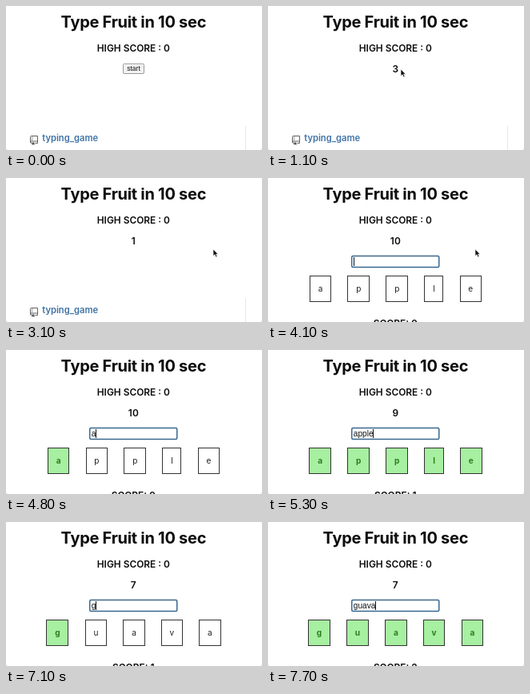
Recreate the animation shown at these times as an HTML page. Size 320 px wide and 180 px high, loop 8 s.

```html
<!DOCTYPE html>
<html lang="en">
<head>
<meta charset="utf-8">
<title>Typing game</title>
<style>
  html, body { margin: 0; width: 100%; height: 100%; overflow: hidden; background: #ddd; }
  #stage { position: relative; width: 320px; height: 180px; overflow: hidden; background: #fff;
    border-radius: 0 0 3px 3px; font-family: Inter, "Open Sans", sans-serif; }
  svg { position: absolute; left: 0; top: 0; }
  .head { text-anchor: middle; fill: #0c0c0c; }
  .title { font-size: 20px; font-weight: 700; letter-spacing: -.014em; }
  .sub { font-size: 11.9px; font-weight: 600; }
  .field { font: 10.1px "Liberation Sans", Arial, sans-serif; fill: #111; }
  .button { font: 8.5px "Liberation Sans", Arial, sans-serif; text-anchor: middle; fill: #111; }
  .link { font-size: 11.2px; font-weight: 600; fill: #3f73a8; }
  #tiles { position: absolute; left: 0; top: 122px; width: 319px; display: flex; justify-content: center; gap: 20.2px; }
  #tiles span { box-sizing: border-box; height: 33px; padding: 0 9.8px; border: 1px solid #333;
    font-size: 10.1px; line-height: 31px; color: #222; }
  #tiles .hit { background: #a7efa1; color: #2a7f1e; font-weight: 700; }
  [hidden] { display: none !important; }
</style>
</head>
<body>
<div id="stage">
  <svg width="320" height="180">
    <text class="head title" x="159.4" y="27">Type Fruit in 10 sec</text>
    <text class="head sub" x="159.3" y="57">HIGH SCORE : 0</text>
    <text class="head sub" id="count" x="159.3" y="83"></text>

    <g id="start">
      <rect id="face" x="146.5" y="72.2" width="26" height="12.3" rx="1.5" stroke="#9a9a9a"/>
      <text class="button" x="159.5" y="81.3">start</text>
    </g>

    <g id="footer">
      <path d="M299.5 150V180" stroke="#e8e8e8"/>
      <g transform="translate(30.5 162.5)" fill="none" stroke="#606060">
        <path d="M0 8.5V1Q0 0 1 0H9V9H6M2 9Q0 9 0 7.500T2 6.500H9"/>
        <path d="M2 0V6" stroke-width=".6"/>
        <path d="M2 8h3v3.500l-1.500-1-1.500 1z" fill="#555" stroke="none"/>
      </g>
      <text class="link" x="45.2" y="169.3">typing_game</text>
    </g>

    <g id="game">
      <rect x="104.75" y="97.5" width="109" height="14" rx="1.5" fill="#fff" stroke="#3a688f" stroke-width="1.5"/>
      <text class="field" id="typed" x="106.8" y="107.7"></text>
      <rect id="caret" y="99" width="1" height="11" fill="#111"/>
      <text class="head sub" id="score" x="159.3" y="186"></text>
    </g>
  </svg>
  <div id="tiles"></div>
  <svg width="320" height="180">
    <path id="pointer" d="M0 0V8.500L2 6.700L3.500 10L5 9.300L3.600 6.200H6Z" fill="#111" stroke="#fff" stroke-width=".6"/>
  </svg>
</div>
<script>
const LOOP = 8000, TICK = 100, PRESS = 1000, COUNTDOWN = 1100, GAME = 4100, KEY = 150, BLINK = 500;
const rounds = [
  { word: 'apple', shown: GAME, firstKey: 4700 },
  { word: 'guava', shown: 6300, firstKey: 7100 },
];
const $ = id => document.getElementById(id);
const show = (id, on) => $(id).toggleAttribute('hidden', !on);
const clamp = (v, lo, hi) => Math.min(hi, Math.max(lo, v));
const mix = (a, b, k) => a.map((v, i) => v + (b[i] - v) * k);

function ease(t, from, to) {
  const k = clamp((t - from) / (to - from), 0, 1);
  return k * k * (3 - 2 * k);
}

// The pointer swings up to the button, then drifts off to the right.
function pointerAt(t) {
  const enter = [36, 168], bend = [240, -12], button = [166, 79], rest = [259, 89];
  const k = ease(t, 100, 900);
  const swing = mix(mix(enter, bend, k), mix(bend, button, k), k);
  return mix(swing, rest, ease(t, 1200, 1700));
}

const hitsAt = (round, t) => clamp(Math.floor((t - round.firstKey) / KEY) + 1, 0, round.word.length);

function countAt(t) {
  const [from, start] = t < GAME ? [3, COUNTDOWN] : [10, GAME];
  return t < COUNTDOWN ? '' : from - Math.floor((t - start) / 1000);
}

function drawTiles(word, hits) {
  $('tiles').replaceChildren(...[...word].map((letter, i) => {
    const tile = document.createElement('span');
    tile.textContent = letter;
    tile.classList.toggle('hit', i < hits);
    return tile;
  }));
}

function drawGame(t) {
  const round = rounds.filter(r => t >= r.shown).pop();
  const hits = hitsAt(round, t);
  const lastInput = hits ? round.firstKey + (hits - 1) * KEY : round.shown;
  $('typed').textContent = round.word.slice(0, hits);
  $('score').textContent = 'SCORE: ' + rounds.filter(r => hitsAt(r, t) === r.word.length).length;
  $('caret').setAttribute('x', Math.round(106.5 + (hits ? $('typed').getComputedTextLength() : 0)));
  show('caret', Math.floor((t - lastInput) / BLINK) % 2 === 0);
  drawTiles(round.word, hits);
}

function render(t) {
  const playing = t >= GAME;
  show('start', t < COUNTDOWN);
  show('footer', !playing);
  show('game', playing);
  show('tiles', playing);
  show('pointer', t >= 100 && t < rounds[0].firstKey);
  $('face').setAttribute('fill', t >= PRESS ? '#e2e2e2' : '#f2f2f2');
  $('count').textContent = countAt(t);
  $('pointer').setAttribute('transform', `translate(${pointerAt(t)})`);
  if (playing) drawGame(t);
}

let last = -1;
function frame() {
  const t = Math.floor(performance.now() % LOOP / TICK) * TICK;
  if (t !== last) render(last = t);
  requestAnimationFrame(frame);
}
frame();
</script>
</body>
</html>
```
